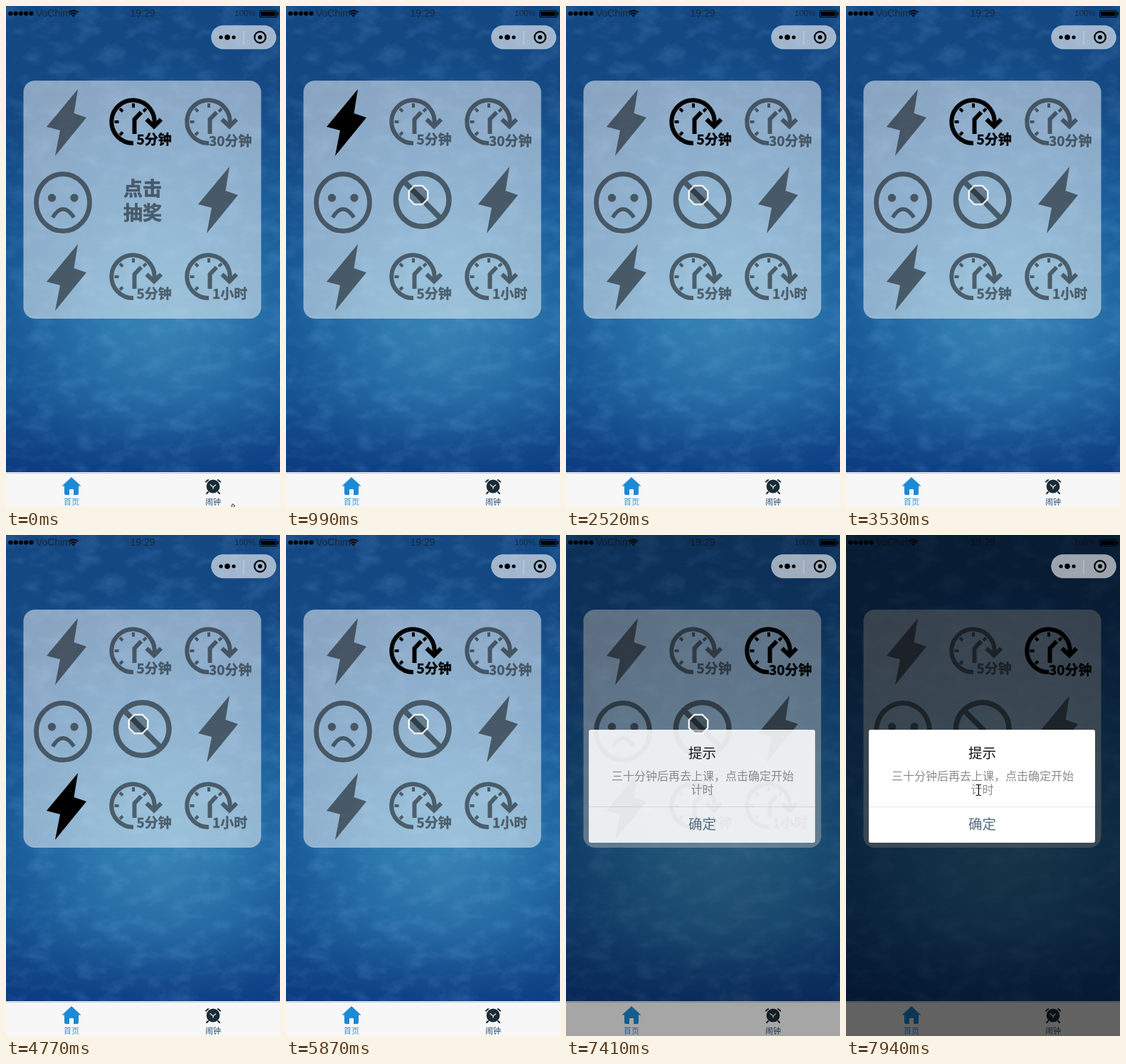
An HTML page for the animation above (8000 ms loop, 385 px wide and 705 px high).

```html
<!DOCTYPE html>
<html lang="zh">
<head>
<meta charset="utf-8">
<style>
html, body { margin: 0; width: 385px; height: 705px; overflow: hidden; background: #0b3a7c; }
svg { display: block; font-family: "Noto Sans CJK SC", "Noto Sans CJK", "Noto Sans", sans-serif; }
.latin { font-family: "Liberation Sans", Arial, sans-serif; }
.line { fill: none; stroke: #000; stroke-width: 6; }
.bold { font-weight: 700; }
.mid { text-anchor: middle; }
</style>
</head>
<body>
<svg width="385" height="705" viewBox="0 0 385 705">
  <defs>
    <radialGradient id="sky" gradientUnits="userSpaceOnUse" cx="0" cy="0" r="1"
      gradientTransform="translate(222 465) scale(310 400)">
      <stop offset="0" stop-color="#3985b7"/>
      <stop offset=".3" stop-color="#2d79ae"/>
      <stop offset=".65" stop-color="#1b5f9c"/>
      <stop offset="1" stop-color="#134883"/>
    </radialGradient>
    <linearGradient id="floor" x1="0" y1="0" x2="0" y2="1">
      <stop offset="0" stop-color="#08327a" stop-opacity="0"/>
      <stop offset=".5" stop-color="#08327a" stop-opacity=".2"/>
      <stop offset="1" stop-color="#08327a" stop-opacity=".75"/>
    </linearGradient>
    <filter id="grain" x="0" y="0" width="1" height="1" color-interpolation-filters="sRGB">
      <feTurbulence type="fractalNoise" baseFrequency=".03 .05" numOctaves="4" seed="4"/>
      <feColorMatrix values="0 0 0 0 .6  0 0 0 0 .8  0 0 0 0 1  .35 0 0 0 -.16"/>
    </filter>
    <path id="bolt" d="M101 117L57 170L76 175L69 211L113 157L95.500 151Z"/>
    <g id="dial">
      <path class="line" d="M179 193A30.200 30.200 0 1 1 208.200 168"/>
      <path class="line" d="M197.500 159.500L208 169.500L218 159.500"/>
      <path class="line" d="M190 149.500L180.500 159.500V180"/>
      <path class="line" d="M179 137V143M152.500 163H158.500M160 144.500L164 148.500M197 144.500L193 148.500M160 181.500L164 177.500" style="stroke-width:4"/>
    </g>
    <g id="face">
      <ellipse class="line" cx="80" cy="276.500" rx="37.500" ry="40.200" style="stroke-width:6.800"/>
      <circle cx="64.500" cy="270" r="5.700"/><circle cx="96" cy="270" r="5.700"/>
      <path class="line" d="M65.500 297.500Q80 274 95.500 297.500" style="stroke-width:5.500"/>
    </g>
  </defs>

  <rect width="385" height="705" fill="url(#sky)"/>
  <rect y="440" width="385" height="217" fill="url(#floor)"/>
  <rect width="385" height="656" filter="url(#grain)"/>
  <rect x="24.500" y="105" width="334" height="335" rx="16" fill="#fff" fill-opacity=".5"/>

  <g id="cells" class="bold" font-size="19"></g>

  <g opacity=".5">
    <g id="start" class="bold mid" font-size="27" stroke="#000" stroke-width=".7">
      <text x="192" y="267">点击</text><text x="192" y="301">抽奖</text>
    </g>
    <g id="ban" fill="none" stroke="#000" stroke-width="7.500">
      <circle cx="191.700" cy="273" r="37.300"/>
      <path d="M165 246L218.500 300"/>
    </g>
  </g>

  <g class="latin" fill="#1a2a3c">
    <g id="signal" fill="#000"></g>
    <text x="42" y="14.500" font-size="14">VoChim</text>
    <g fill="none" stroke="#000" stroke-width="1.800">
      <path d="M88.500 9Q94.800 4 101 9M91 11.500Q94.800 8.500 98.500 11.500"/>
    </g>
    <path d="M92.500 13Q94.800 11.500 97 13L94.800 15.500Z" fill="#000"/>
    <text class="mid" x="192" y="15" font-size="14">19:29</text>
    <text x="321" y="13.500" font-size="11.500">100%</text>
    <rect x="356.500" y="6.500" width="24" height="9" rx="1.500" fill="none" stroke="#000"/>
    <rect x="358" y="8" width="21" height="6" fill="#000"/>
    <rect x="381.500" y="9" width="1.500" height="4" fill="#000"/>
  </g>

  <rect y="656" width="385" height="49" fill="#f7f7f8"/>
  <rect y="657" width="385" height="1" fill="#bcc5cf"/>
  <path d="M92 663L105.500 675.500H102V686Q102 688 100 688H95V680H89V688H84Q82 688 82 686V675.500H78.500Z" fill="#1e8ad4"/>
  <text class="mid" x="92" y="702" font-size="11" fill="#3296d6">首页</text>
  <g fill="none" stroke="#1c2c36" stroke-width="2.200" stroke-linecap="round">
    <path d="M281 669.500L284 667M301 669.500L298 667M284 684L282 686M298 684L300 686"/>
    <circle cx="291" cy="676" r="8.300" fill="#1c2c36"/>
    <path d="M287 673.500L291 677L294.500 674M291 677V679" stroke="#e4eef2" stroke-width="1.300"/>
  </g>
  <text class="mid" x="291" y="702" font-size="11" fill="#285075">闹钟</text>

  <rect id="shade" width="385" height="705"/>
  <g>
    <rect x="288.500" y="27.500" width="91" height="33" rx="16.500" fill="#fff" fill-opacity=".6" stroke="#fff" stroke-opacity=".25"/>
    <circle cx="302" cy="44" r="2.600"/><circle cx="311" cy="44" r="3.800"/><circle cx="320" cy="44" r="2.600"/>
    <path d="M334 35V54" stroke="#fff" stroke-opacity=".4"/>
    <circle cx="357" cy="44" r="7.800" fill="none" stroke="#000" stroke-width="2.200"/>
    <circle cx="357" cy="44" r="3"/>
  </g>

  <g id="dialog" class="mid">
    <rect x="32" y="274" width="318" height="159" rx="3" fill="#fff"/>
    <text x="191.500" y="313.500" font-size="19.500" fill="#111">提示</text>
    <g font-size="16" fill="#8c8c8c">
      <text x="192" y="345">三十分钟后再去上课，点击确定开始</text>
      <text x="191.500" y="364">计时</text>
    </g>
    <path d="M32 382.500H350" stroke="#e3e5e8"/>
    <text x="191.500" y="414" font-size="19.500" fill="#576b85">确定</text>
  </g>

  <path id="hand" d="M317.500 706V702.500Q319 699 320.500 702.500V706" fill="#fff" stroke="#000"/>
  <path id="ring" d="M-5.500 -13.200H5.500L13.200 -5.500V5.500L5.500 13.200H-5.500L-13.200 5.500V-5.500Z"
    fill="#000" fill-opacity=".3" stroke="#fff" stroke-width="2.200"/>
  <path id="beam" d="M182.500 351.500H185Q186.500 351.500 186.500 353V365Q186.500 366.500 185 366.500H182.500M190 351.500H188Q186.500 351.500 186.500 353M190 366.500H188Q186.500 366.500 186.500 365" fill="none" stroke="#000"/>
</svg>
<script>
const LOOP = 8000;
const $ = id => document.getElementById(id);
const clamp = v => Math.min(1, Math.max(0, v));
const smooth = p => p * p * (3 - 2 * p);
const show = (el, on) => el.setAttribute("visibility", on ? "visible" : "hidden");
const use = (id, x = 0, y = 0) => `<use href="#${id}" x="${x}" y="${y}"/>`;
const timer = (x, y, label, tx, ty) => use("dial", x, y) +
  `<text x="${tx}" y="${ty}" stroke="#000" stroke-width=".4">${label}</text>`;

// Clockwise from the top left.
const cells = [
  use("bolt"),
  timer(0, 0, "5分钟", 183.5, 194.5),
  timer(106, 0, "30分钟", 285, 196.5),
  use("bolt", 213, 109),
  timer(106, 218, "1小时", 290, 412),
  timer(0, 218, "5分钟", 183.5, 412),
  use("bolt", 0, 218),
  use("face")
];
$("cells").innerHTML = cells.map(c => `<g>${c}</g>`).join("");
const cellNodes = [...$("cells").children];
$("signal").innerHTML = [0, 1, 2, 3, 4].map(i => `<circle cx="${6.3 + i * 7.3}" cy="10.5" r="3.1"/>`).join("");

// Fast spin: cells passed per tick. Slow spin: one cell at each time.
const TICK = 76.56, SPIN_START = 529;
const fastMoves = [..."111111121212121212222222211"].map(Number);
const slowTimes = [2600, 2680, 2830, 2910, 3060, 3210, 3380, 3530, 3760,
  3990, 4220, 4540, 4770, 5150, 5470, 5870, 6250];

function litCell(t) {
  const ticks = Math.max(0, Math.floor((t - SPIN_START) / TICK) + 1);
  const fast = fastMoves.slice(0, ticks).reduce((a, b) => a + b, 0);
  return (1 + fast + slowTimes.filter(s => s <= t).length) % cells.length;
}

function render(t) {
  const lit = litCell(t);
  cellNodes.forEach((n, i) => n.setAttribute("opacity", i === lit ? 1 : 0.5));

  const clicked = t >= 450;
  show($("start"), !clicked);
  show($("ban"), clicked);

  const fade = t < 7260 ? 0 : clamp((t - 7247) / 300);
  $("shade").setAttribute("opacity", fade * 0.6);
  $("dialog").setAttribute("opacity", clamp(fade * 1.6));

  const arrive = smooth(clamp((t - 20) / 400));
  const leave = smooth(clamp((t - 7540) / 380));
  const x = 318 - 132 * arrive;
  const y = 703 - 437 * arrive + 93 * leave;
  const onText = y > 330 && t > 7260;
  $("ring").setAttribute("transform", `translate(${x} ${y})`);
  show($("hand"), t < 70);
  show($("ring"), t >= 70 && !onText);
  show($("beam"), onText);
  $("beam").setAttribute("transform", `translate(0 ${y - 359})`);
}

const began = performance.now();
function tick() {
  render((performance.now() - began) % LOOP);
  requestAnimationFrame(tick);
}
render(0);
requestAnimationFrame(tick);
</script>
</body>
</html>
```
